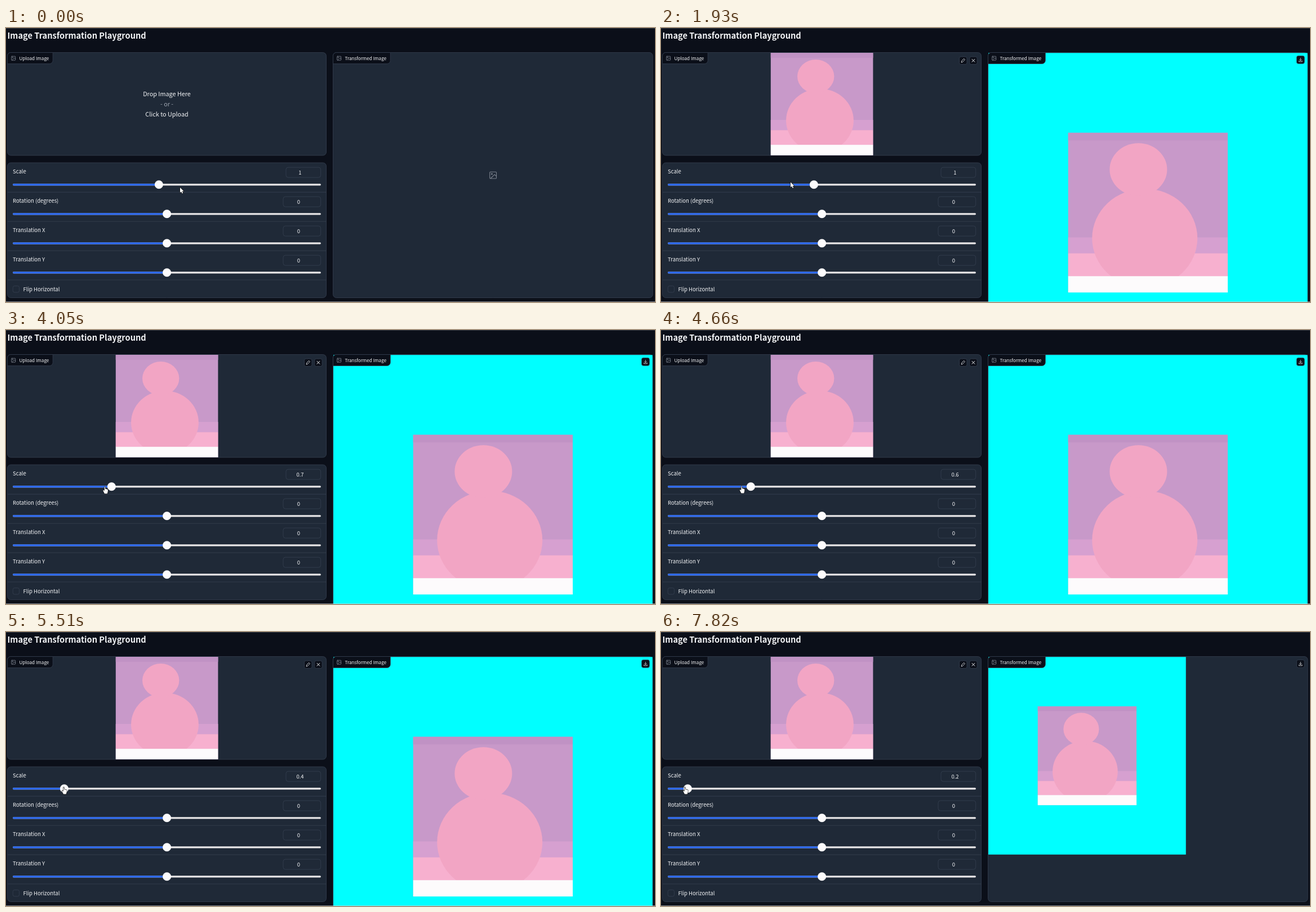
Write an HTML page with a canvas that moves like this. It is 1152x486 px and loops after 8 s.

```html
<!DOCTYPE html>
<html lang="en">
<head>
<meta charset="utf-8">
<title>Image Transformation Playground</title>
<style>
  html, body { margin: 0; width: 100%; height: 100%; overflow: hidden; background: #0b0f19; }
  canvas { display: block; width: 1152px; height: 486px; }
</style>
</head>
<body>
<canvas id="stage"></canvas>
<script>
const W = 1152, H = 486, LOOP = 8000;
const canvas = document.getElementById('stage');
const ctx = canvas.getContext('2d');
const dpr = window.devicePixelRatio || 1;
canvas.width = W * dpr;
canvas.height = H * dpr;

const FONT = '"Noto Sans CJK JP", "Noto Sans CJK SC", "Noto Sans CJK", "Noto Sans", sans-serif';
const BG = '#0b0f19', PANEL = '#1f2937', LINE = '#374151', TEXT = '#f3f4f6', MUTED = '#9ca3af';

const TICK = 210.8, FIRST_TICK = 18;
const UPLOADED = 210, RENDERED = 430;
const APPROACH = 9, GRAB = 10;

// Pointer x at a few ticks, linear in between
const DRAG = [[9, 230], [11, 270], [16, 209], [22, 144], [26, 103.5], [27, 103.5], [31, 70], [33, 59.5], [37, 43.5]];

const UNIT = 280, ONE_X = 271.4;   // slider pixels per 1.0, and where 1.0 sits

const clamp = (v, lo, hi) => Math.min(hi, Math.max(lo, v));

function dragX(tick) {
  const i = clamp(DRAG.findIndex(k => k[0] > tick), 1, DRAG.length - 1);
  const last = DRAG.length - 1;
  const j = tick >= DRAG[last][0] ? last : i;
  const [t0, x0] = DRAG[j - 1], [t1, x1] = DRAG[j];
  return x0 + (x1 - x0) * clamp((tick - t0) / (t1 - t0), 0, 1);
}

// The hand sags slightly in the middle of the drag
const dragY = x => 281.5 + 2.7 * Math.sin(Math.PI * clamp((x - 103.5) / 166.5, 0, 1));

// The slider snaps to tenths and trails the pointer by one tick
function scaleAt(tick) {
  if (tick <= GRAB) return 1;
  return Math.round((1 + (dragX(tick - 1) - ONE_X) / UNIT) * 10) / 10;
}

function box(x, y, w, h, r, fill, stroke) {
  ctx.beginPath();
  ctx.roundRect(x, y, w, h, r);
  if (fill) { ctx.fillStyle = fill; ctx.fill(); }
  if (stroke) { ctx.strokeStyle = stroke; ctx.lineWidth = 0.8; ctx.stroke(); }
}

function rect(x, y, w, h, fill) {
  ctx.fillStyle = fill;
  ctx.fillRect(x, y, w, h);
}

function disc(x, y, rx, ry, fill) {
  ctx.beginPath();
  ctx.ellipse(x, y, rx, ry, 0, 0, 2 * Math.PI);
  ctx.fillStyle = fill;
  ctx.fill();
}

function text(str, x, y, size, { color = TEXT, align = 'left', weight = 400 } = {}) {
  ctx.font = `${weight} ${size}px ${FONT}`;
  ctx.textAlign = align;
  ctx.fillStyle = color;
  ctx.fillText(str, x, y);
}

function lines(color, width, path) {
  ctx.strokeStyle = color;
  ctx.lineWidth = width;
  ctx.lineCap = ctx.lineJoin = 'round';
  ctx.stroke(new Path2D(path));
}

function at(x, y, scale, draw) {
  ctx.save();
  ctx.translate(x, y);
  ctx.scale(scale, scale);
  draw();
  ctx.restore();
}

function imageIcon(x, y, size, color) {
  at(x, y, size / 18, () =>
    lines(color, 1.7, 'M2 0H16Q18 0 18 2V16Q18 18 16 18H2Q0 18 0 16V2Q0 0 2 0Z' +
      'M4 5.5a1.6 1.6 0 1 0 3.2 0a1.6 1.6 0 1 0 -3.2 0M18 12L13 7L2 18'));
}

function tab(x, w, label) {
  box(x, 43.5, w, 20, [6, 0, 6, 0], BG, LINE);
  imageIcon(x + 7.2, 50.2, 7, MUTED);
  text(label, x + 21, 57, 8.15);
}

function button(x, y, size, width, icon) {
  box(x, y, size, size, 3, BG, LINE);
  at(x + size / 2, y + size / 2, 1, () => lines(TEXT, width, icon));
}

function picture(x, y, size) {
  at(x, y, size, () => {
    rect(0, 0, 1, 1, '#c899c9');
    rect(0, 0, 1, 0.048, '#c092c4');
    rect(0, 0.655, 1, 0.1, '#d6a0d0');
    rect(0, 0.755, 1, 0.145, '#f7b0cf');
    disc(0.48, 0.66, 0.33, 0.31, '#f2a5c4');
    disc(0.44, 0.23, 0.18, 0.165, '#f2a5c4');
    rect(0, 0.898, 1, 0.102, '#fdfbfc');
  });
}

function uploadPanel(t) {
  box(2.5, 43.5, 566, 182.5, 6, PANEL, LINE);
  if (t < UPLOADED) {
    ['Drop Image Here', '- or -', 'Click to Upload'].forEach((str, i) =>
      text(str, 285.5, 121 + i * 18, 10.8, { align: 'center', color: i === 1 ? MUTED : TEXT }));
  } else {
    picture(194.8, 44.1, 181.6);
    button(529.5, 51, 13.5, 0.8, 'M-3 3L-2.5 0.5L1.4 -3.4L3.2 -1.6L-0.7 2.4Z');
    button(547.7, 51, 13.5, 1, 'M-2.4 -2.4L2.4 2.4M2.4 -2.4L-2.4 2.4');
  }
  tab(2.5, 80.7, 'Upload Image');
}

function resultPanel(t, tick) {
  const ready = t >= RENDERED;
  const size = ready ? Math.min(566.5, 1753 * scaleAt(tick)) : 0;
  box(580.5, 43.5, 567.5, Math.max(435, size + 1), 6, PANEL, LINE);
  if (ready) {
    box(581.1, 44.2, size, size, 0, '#00ffff');
    picture(581.1 + size / 4, 44.2 + size / 4, size / 2);
    button(1128.3, 49.4, 13.8, 0.75, 'M0 -3V1.6M-1.9 -0.2L0 1.7L1.9 -0.2M-2.9 2V3.4H2.9V2');
  } else {
    imageIcon(858.7, 255.2, 11.8, '#7b828e');
  }
  tab(580.5, 101.8, 'Transformed Image');
}

function slider(row, label, value, thumb, fieldX) {
  const y = 277.8 + row * 52;
  text(label, 12, y - 19.6, 9.5);
  box(fieldX, y - 30.7, 558.7 - fieldX, 18, 4, PANEL, LINE);
  text(value, (fieldX + 547) / 2, y - 17.8, 9.5, { align: 'center' });
  box(12, y - 1.6, 547, 3.2, 1.6, '#e8e6e7');
  box(12, y - 1.6, thumb - 12, 3.2, 1.6, '#2563eb');
  disc(thumb, y, 7.5, 7.5, '#fcfbfc');
}

function controls(scale) {
  box(2.5, 239, 566, 239.5, 6, PANEL, LINE);
  for (let i = 0; i < 4; i++) rect(3, 290.8 + i * 51.9, 565, 0.8, LINE);
  slider(0, 'Scale', String(scale), ONE_X + (scale - 1) * UNIT, 497);
  ['Rotation (degrees)', 'Translation X', 'Translation Y'].forEach((label, i) =>
    slider(i + 1, label, '0', 285.6, 492));
  box(12.2, 457.5, 11.4, 11.4, 3, PANEL, LINE);
  text('Flip Horizontal', 30.5, 466.8, 9.5);
}

function cursor(x, y, path) {
  at(x, y, 0.76, () => {
    lines('#111', 1.6, path);
    ctx.fillStyle = '#fff';
    ctx.fill(new Path2D(path));
  });
}

const ARROW = 'M0 0V12L2.8 9.4L4.8 13.8L6.8 12.9L4.9 8.6L8.6 8.4Z';
const HAND = 'M-2.2 -8H-0.6V-3.4L5.6 -1.6V3L4.2 8H-2L-5.6 1L-4.4 -0.4L-2.2 1.6Z';

function pointer(tick) {
  if (tick < APPROACH) return cursor(309, 283, ARROW);
  const x = dragX(tick);
  if (tick < GRAB) return cursor(x, 273.5, ARROW);
  cursor(x, dragY(x), HAND);
}

function draw(t) {
  const tick = Math.floor((t - FIRST_TICK) / TICK);
  ctx.setTransform(dpr, 0, 0, dpr, 0, 0);
  rect(0, 0, W, H, BG);
  rect(0, 0, W, 0.8, '#43464e');
  text('Image Transformation Playground', 2.5, 19.2, 14.6, { weight: 700 });
  uploadPanel(t);
  resultPanel(t, tick);
  controls(scaleAt(tick));
  rect(0, 485.4, W, 0.6, '#d5d6d9');
  pointer(tick);
}

const start = performance.now();
function frame() {
  draw((performance.now() - start) % LOOP);
  requestAnimationFrame(frame);
}
frame();
</script>
</body>
</html>
```
